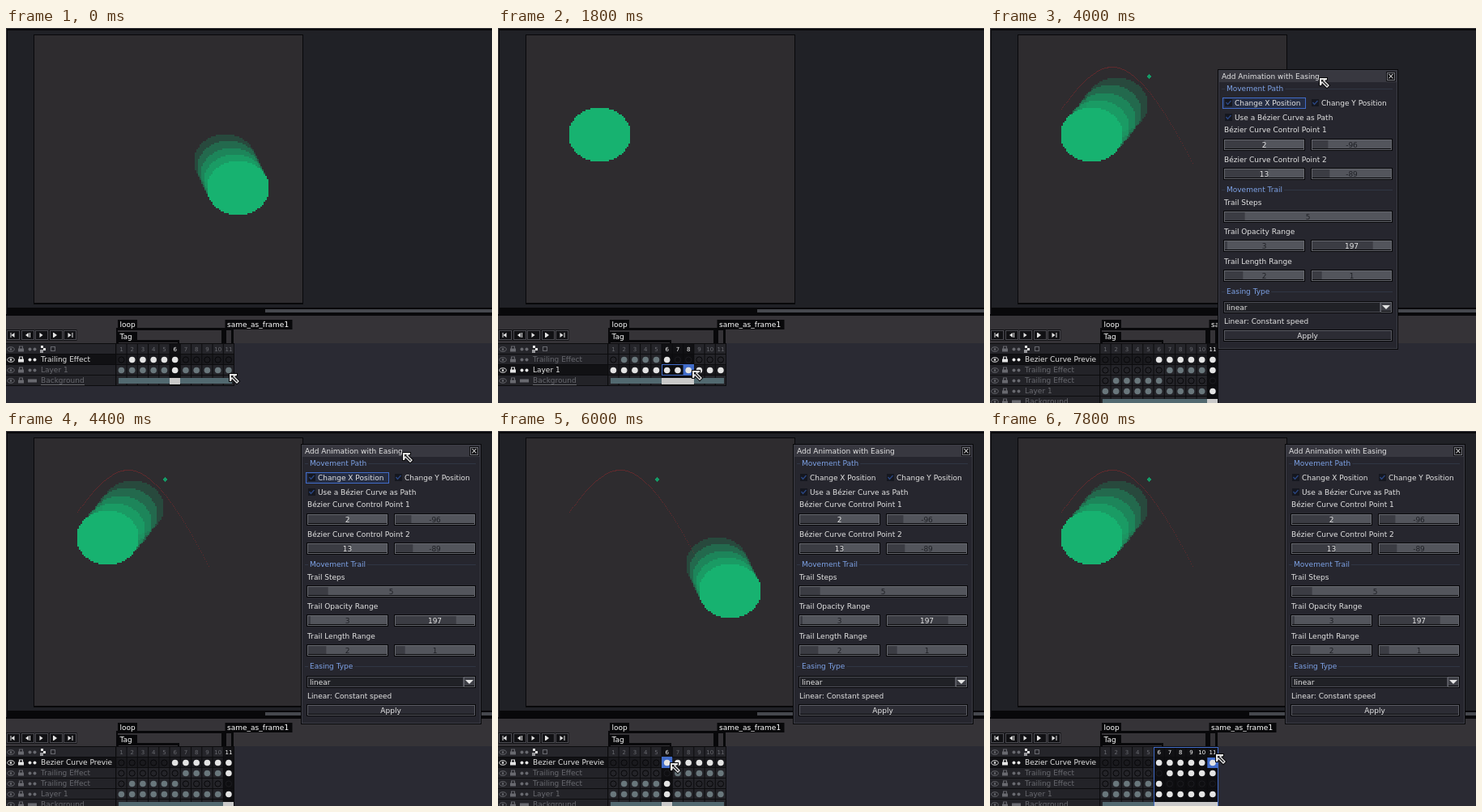
Write an HTML page with a canvas that moves like this. It is 600 by 464 pixels and loops after 8000 ms.

```html
<!DOCTYPE html>
<html lang="en">
<head>
<meta charset="utf-8">
<title>Animation with easing</title>
<style>
html, body { margin: 0; width: 100%; height: 100%; overflow: hidden; background: #202126; }
canvas { display: block; }
</style>
</head>
<body>
<canvas id="stage" width="600" height="464"></canvas>
<script>
const ctx = document.getElementById('stage').getContext('2d');
const STEP = 200, STEPS = 40;
const FONT = '"DejaVu Sans", sans-serif';
const WHITE = '#e4e4e4', GRAY = '#68696f', BLUE = '#416cc9', GREEN = '#17b270', BLACK = '#08080a';
const CELL = 13.25, CELLS_X = 135.8, ROWS_Y = 404, ROW_H = 13;

// Moments of the story, counted in steps.
const PICK_LAYER = 4, DRAG_CELLS = 7, OPEN = 13, GRAB = 19, DROP = 22, REST = 24, SCRUB = 29, COLUMNS = 35;

const clamp = (v, lo, hi) => Math.min(hi, Math.max(lo, v));
const cellX = f => CELLS_X + (f - 1) * CELL;

// Moves from a to b; each axis has its own ease-in power.
function glide(a, b, k, powers = [1, 1]) {
  k = clamp(k, 0, 1);
  return a.map((v, i) => Math.round(v + (b[i] - v) * k ** powers[i]));
}

// Selected frames first..current; row -1 selects whole columns.
function selection(step) {
  if (step < PICK_LAYER) return { current: 6, first: 6, row: 0 };
  if (step < DRAG_CELLS) return { current: 11, first: 11, row: 1 };
  if (step < OPEN) return { current: Math.min(11, step - 1), first: 6, row: 1 };
  if (step < SCRUB) return { current: 11, first: 11, row: 0 };
  if (step >= COLUMNS) return { current: step - 28, first: 6, row: -1 };
  const current = 6 + Math.max(0, step - 30);
  return { current, first: current, row: 0 };
}

function windowAt(step) {
  return glide([268, 56], [364, 17], (step - GRAB) / (DROP - GRAB), [1.8, 2.1]);
}

function pointerAt(step) {
  if (step < PICK_LAYER) return [276 + Math.round(58 * Math.sin(step / PICK_LAYER * Math.PI)), 428];
  if (step < DRAG_CELLS) return glide([276, 424], [212, 424], (step - PICK_LAYER) / 3);
  if (step >= OPEN && step < GRAB) return glide([276, 428], [394, 66], (step - 12) / 6, [1, 4]);
  if (step >= GRAB && step <= DROP) {
    const [x, y] = windowAt(step);
    return [x + 126, y + 10];
  }
  if (step > DROP && step <= REST) return glide([490, 27], [282, 298], (step - DROP) / 2);
  if (step > REST && step < SCRUB) return glide([282, 298], [212, 411], (step - REST) / 5);
  const { current, row } = selection(step);
  return [Math.round(cellX(current) + 11), row < 0 ? 400 : ROWS_Y + 7 + row * ROW_H];
}

function rect(x, y, w, h, color) {
  ctx.fillStyle = color;
  ctx.fillRect(x, y, w, h);
}

function frame(x, y, w, h, color) {
  ctx.strokeStyle = color;
  ctx.lineWidth = 1;
  ctx.strokeRect(x + .5, y + .5, w - 1, h - 1);
}

function text(s, x, y, color = WHITE, size = 9, align = 'left') {
  ctx.font = `${size}px ${FONT}`;
  ctx.textAlign = align;
  ctx.fillStyle = color;
  ctx.fillText(s, x, y);
}

function poly(points, fill, stroke) {
  ctx.beginPath();
  points.forEach(([x, y]) => ctx.lineTo(x, y));
  ctx.closePath();
  if (stroke) {
    ctx.strokeStyle = stroke;
    ctx.lineWidth = 2;
    ctx.stroke();
  }
  ctx.fillStyle = fill;
  ctx.fill();
}

function dot(x, y, r, fill, stroke) {
  ctx.beginPath();
  ctx.arc(x, y, r, 0, 7);
  if (fill) { ctx.fillStyle = fill; ctx.fill(); }
  if (stroke) { ctx.strokeStyle = stroke; ctx.lineWidth = 1; ctx.stroke(); }
}

// Cubic Bézier path of the ball's top left corner, from frame 6 to frame 11.
function curve(t) {
  const mix = (a, b, c, d) => a * (1 - t) ** 3 + 3 * t * (1 - t) * (b * (1 - t) + c * t) + d * t ** 3;
  return [mix(250, 174, 144, 88), mix(167, 22, 22, 100)];
}

// Ellipse with stair-stepped edges; x and y are its top left corner.
function ball([x, y], alpha = 1) {
  ctx.globalAlpha = alpha;
  for (let r = 0; r < 33; r++) {
    const v = (r - 16) / 16.6;
    const half = Math.floor(18.9 * Math.sqrt(1 - v * v)) * 2 + 1;
    rect(x + 37 - half, y + r * 2 - 1, half * 2 + 1, 2, GREEN);
  }
  ctx.globalAlpha = 1;
}

function trailedBall(from, to) {
  for (let i = 0; i < 4; i++) ball(glide(from, to, i / 4), .21 + i * .09);
  ball(glide(from, to, 1));
}

function drawCanvas(current, preview) {
  rect(0, 0, 600, 356, '#353337');
  rect(1, 1, 599, 353, BLACK);
  rect(2, 3, 598, 351, '#202126');
  rect(34, 8, 333, 334, BLACK);
  rect(35, 9, 331, 331, '#2e2c2f');
  rect(2, 346, 598, 8, BLACK);
  rect(320, 348, 280, 4, '#46484e');
  if (preview) {
    for (let i = 0; i <= 150; i++) {
      const [x, y] = curve(i / 150);
      rect(Math.round(x), Math.round(y), 1, 1, '#602a2d');
    }
    rect(194, 59, 5, 2, '#149a66');
    rect(195, 58, 3, 4, '#149a66');
    rect(196, 57, 1, 6, '#149a66');
  }
  if (current === 6) trailedBall([233, 133], [249, 166]);
  else if (preview) trailedBall(curve((current - 7) / 5), curve((current - 6) / 5));
  else ball([88, 100]);
}

function drawPlayback() {
  for (let i = 0; i < 5; i++) {
    const x = 8.5 + i * 17.5, y = 380, side = i < 2 ? -1 : 1;
    rect(x - 8, 373, 17, 14, '#111114');
    frame(Math.round(x - 7.5), 374, 16, 12, '#4a4a50');
    poly([[x - 2 * side, y - 3], [x + 2 * side, y], [x - 2 * side, y + 3]], WHITE);
    if (i % 4 === 0) rect(x + 3 * side, y - 3, 1, 6, WHITE);
    else if (i !== 2) rect(x - 3 * side, y - 3, 1, 6, WHITE);
  }
}

function bracket(x, y, w, thick) {
  rect(x, y, w, 3, BLACK);
  rect(x, y, 2, 391 - y, BLACK);
  rect(x + w - thick, y, thick, 391 - y, BLACK);
}

function tag(label, x, y, w) {
  rect(x, y, w, 12, BLACK);
  text(label, x + 2.5, y + 9, '#fff');
}

function drawTags() {
  bracket(136, 371, 134, 4);
  bracket(137, 386, 77, 2);
  bracket(270, 371, 11, 3);
  tag('loop', 138, 361, 24);
  tag('Tag', 138, 376, 24);
  tag('same_as_frame1', 270.5, 361, 83);
}

function rowIcons(y, color, bar) {
  ctx.strokeStyle = color;
  ctx.lineWidth = 1;
  ctx.beginPath();
  ctx.ellipse(6, y, 4.2, 2.7, 0, 0, 7);
  ctx.stroke();
  dot(6, y, 1.3, color);
  frame(16, y - 4, 5, 5, color);
  rect(15, y - 1, 7, 4, color);
  if (bar) rect(27, y - 2, 11, 4, color);
  else {
    dot(29.5, y, 2, color);
    dot(35.5, y, 2, color);
  }
}

function drawTimeline({ current, first, row: selectedRow }, preview) {
  rect(0, 354, 600, 2, BLACK);
  rect(0, 356, 600, 34, '#353337');
  rect(0, 390, 600, 74, '#2a2a33');
  drawPlayback();
  drawTags();

  const layer = (name, from, to) => ({ name, from, to });
  const rows = [layer('Trailing Effect', 2, 6), layer('Layer 1', 1, 11), layer('Background', 1, 11)];
  if (preview) rows.unshift(layer('Bezier Curve Previe', 6, 11), layer('Trailing Effect', 7, 11));
  const activeRow = Math.max(selectedRow, 0);
  const chosen = f => f >= first && f <= current;
  const spanX = Math.round(cellX(first)), spanW = Math.round((current - first + 1) * CELL);
  const outlined = selectedRow !== 0 || (preview && current < 11);

  rect(0, 390, 282, 14 + rows.length * ROW_H, '#0c0c0e');
  rect(0, 391, 135, 12, '#25252a');
  rowIcons(397.5, GRAY);
  rect(43, 393, 3, 3, WHITE);
  rect(46, 396, 3, 3, WHITE);
  rect(42, 398, 4, 4, '#99999d');
  frame(55, 394, 6, 6, GRAY);
  for (let f = 1; f <= 11; f++) {
    rect(cellX(f) + .5, 391, CELL - 1, 12, chosen(f) ? '#111114' : '#25252a');
    text(f, cellX(f) + CELL / 2, 400, chosen(f) ? '#fff' : GRAY, 7, 'center');
  }

  rows.forEach(({ name, from, to }, r) => {
    const top = ROWS_Y + r * ROW_H, mid = top + 6.5;
    const active = r === activeRow, isBar = name === 'Background';
    const color = active ? WHITE : GRAY;
    rect(0, top, 135, 12, active ? '#111114' : '#232328');
    rowIcons(mid, color, isBar);
    text(name, 43, top + 9, color);
    if (isBar) rect(43, top + 11, 54, 1, GRAY);
    for (let f = 1; f <= 11; f++) {
      const x = cellX(f), filled = f >= from && f <= to;
      rect(x + .5, top, CELL - 1, 12, chosen(f) ? '#0e0e11' : active ? '#1a1a1e' : '#242429');
      if (isBar) continue;
      if (active && f === current && outlined) rect(x, top, CELL, 13, BLUE);
      if (filled) dot(x + CELL / 2, mid, 3.8, active || chosen(f) ? WHITE : '#69777c');
      else dot(x + CELL / 2, mid, 3.6, null, chosen(f) ? '#1c1c20' : BLACK);
    }
    if (isBar) {
      rect(139, top + 3, 140, 7, '#526970');
      rect(spanX, top + 3, spanW, 8, '#c9c9c9');
    }
  });

  if (selectedRow < 0) frame(spanX, 391, spanW, 80, BLUE);
  else if (outlined) frame(spanX, ROWS_Y + selectedRow * ROW_H - 1, spanW, 14, BLUE);
}

// A bar of width w whose dark part covers the given share.
function slider(x, y, w, value, share, bright) {
  rect(x, y, w, 15, BLACK);
  frame(x + 1, y + 1, w - 2, 13, '#66686f');
  rect(x + 2, y + 2, w - 4, 10, '#53555c');
  rect(x + 2, y + 2, (w - 4) * share, 10, '#3b3c43');
  text(value, x + w / 2, y + 11, bright ? WHITE : '#1f2025', 9, 'center');
}

function sliderPair(y, left, right) {
  slider(7, y, 101, ...left);
  slider(115, y, 101, ...right);
}

function heading(label, y) {
  rect(5, y - 3, 211, 1, '#303644');
  ctx.font = `9px ${FONT}`;
  rect(9, y - 8, ctx.measureText(label).width + 4, 11, '#26262e');
  text(label, 11, y, '#7da2e6');
}

function checkbox(x, y, label) {
  rect(x, y, 9, 9, '#15171f');
  ctx.strokeStyle = '#2b4783';
  ctx.lineWidth = 1.3;
  ctx.beginPath();
  ctx.moveTo(x + 1.5, y + 4);
  ctx.lineTo(x + 3.5, y + 6.5);
  ctx.lineTo(x + 7.5, y + 2);
  ctx.stroke();
  text(label, x + 12, y + 8);
}

function drawDialog([x, y], focused) {
  ctx.save();
  ctx.translate(x, y);
  rect(0, -1, 223, 347, BLACK);
  frame(1, 0, 221, 345, '#3c3d46');
  rect(2, 1, 219, 343, '#26262e');
  rect(2, 1, 219, 14, '#383840');
  text('Add Animation with Easing', 5, 11);
  rect(208, 2, 12, 12, '#111114');
  frame(209, 3, 10, 10, '#73747b');
  text('×', 214, 11, WHITE, 10, 'center');

  heading('Movement Path', 26);
  if (focused) {
    rect(7, 35, 102, 12, '#252d43');
    frame(6, 34, 103, 14, BLUE);
  }
  checkbox(9, 36, 'Change X Position');
  checkbox(116, 36, 'Change Y Position');
  checkbox(9, 54, 'Use a Bézier Curve as Path');
  text('Bézier Curve Control Point 1', 8, 77);
  sliderPair(85, ['2', .5, true], ['-96', .2]);
  text('Bézier Curve Control Point 2', 8, 114);
  sliderPair(121, ['13', .55, true], ['-89', .22]);

  heading('Movement Trail', 151);
  text('Trail Steps', 8, 167);
  slider(7, 174, 209, '5', .12);
  text('Trail Opacity Range', 8, 203);
  sliderPair(210, ['3', .03], ['197', .77, true]);
  text('Trail Length Range', 8, 240);
  sliderPair(247, ['2', .23], ['1', .12]);

  heading('Easing Type', 277);
  rect(7, 286, 209, 15, BLACK);
  frame(8, 287, 193, 13, '#4a4b53');
  rect(9, 288, 191, 11, '#202126');
  text('linear', 11, 297);
  frame(201, 287, 14, 13, '#62646b');
  rect(202, 288, 12, 10, '#3d3e45');
  poly([[203, 291], [213, 291], [208, 296]], WHITE);
  text('Linear: Constant speed', 8, 314);
  rect(7, 321, 209, 15, BLACK);
  frame(8, 322, 207, 13, '#5a5b63');
  rect(9, 323, 205, 10, '#2c2c34');
  text('Apply', 111, 332, WHITE, 9, 'center');
  ctx.restore();
}

function drawPointer([x, y], moving) {
  ctx.save();
  ctx.translate(x, y);
  if (moving) {
    poly([[0, 0], [9, 9], [5, 9], [0, 13]], WHITE, BLACK);
    ctx.translate(9, 9);
    for (let i = 0; i < 4; i++) {
      poly([[0, -7], [3, -3], [1, -3], [1, -1], [-1, -1], [-1, -3], [-3, -3]], WHITE, BLACK);
      ctx.rotate(Math.PI / 2);
    }
    rect(-1, -1, 2, 2, WHITE);
  } else {
    poly([[0, 0], [9, 0], [9, 2], [6, 3], [12, 9], [9, 12], [3, 6], [2, 9], [0, 9]], WHITE, BLACK);
    poly([[2, 2], [5, 2], [4, 3], [10, 9], [9, 10], [3, 4], [2, 5]], '#17171a');
  }
  ctx.restore();
}

function draw(step) {
  const selected = selection(step), preview = step >= OPEN;
  drawCanvas(selected.current, preview);
  drawTimeline(selected, preview);
  if (preview) drawDialog(windowAt(step), step < SCRUB);
  drawPointer(pointerAt(step), step > DROP && step < SCRUB - 1);
}

const start = performance.now();
let shown = -1;
function tick() {
  const step = Math.floor((performance.now() - start) / STEP) % STEPS;
  if (step !== shown) draw(shown = step);
  requestAnimationFrame(tick);
}
tick();
</script>
</body>
</html>
```
